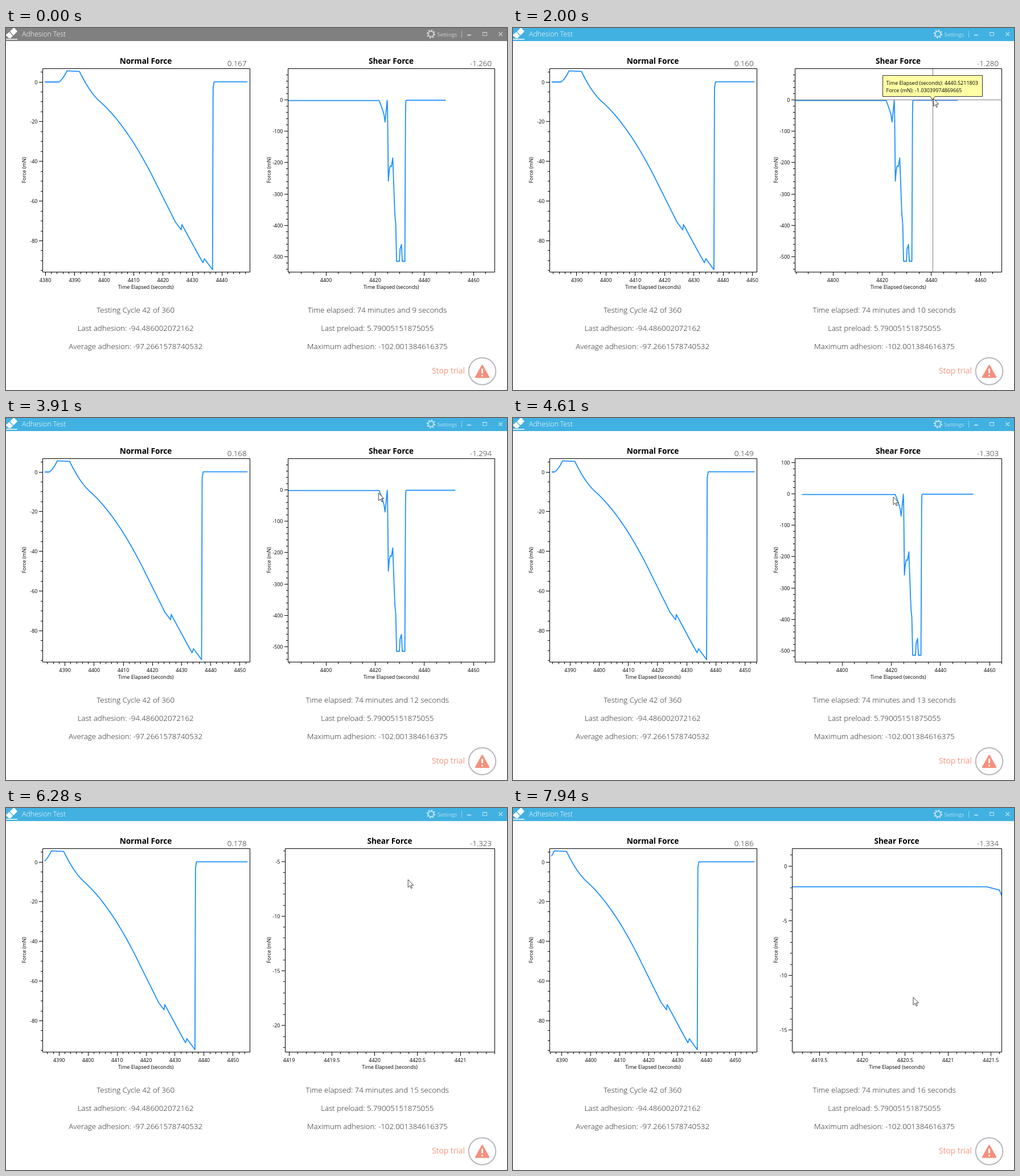
Animation, 880 px wide and 637 px high, one loop 8 s. Source, as an HTML page:

```html
<!DOCTYPE html>
<html lang="en">
<head>
<meta charset="utf-8">
<title>Adhesion Test</title>
<style>
  html, body { margin: 0; width: 100%; height: 100%; overflow: hidden; background: #fff; }
  svg { display: block; width: 100%; height: 100%; font-family: "Open Sans", "Noto Sans", sans-serif; }
  .info { font-size: 13.35px; font-weight: 300; fill: #222; }
  .mid { text-anchor: middle; }
  .end { text-anchor: end; }
  .axis { font-size: 9px; fill: #000; }
  .title { font-size: 13.6px; font-weight: 700; }
  .frame { fill: none; stroke: #000; }
  .curve { fill: none; stroke: #1e90ff; stroke-width: 1.8; stroke-linejoin: round; }
</style>
</head>
<body>
<svg viewBox="0 0 880 637">
  <defs>
    <clipPath id="clipN"><rect x="65" y="72" width="364" height="357"/></clipPath>
    <clipPath id="clipS"><rect id="clipRect" y="72" height="357"/></clipPath>
  </defs>
  <rect width="880" height="637" fill="#fff"/>

  <rect id="bar" width="880" height="23"/>
  <g fill="#fff">
    <path d="M7 6L13 0H15L20 6L13 13ZM6 7L12 14L8 18H5L0 13V12ZM0 19H20V20.5H0Z"/>
    <text x="28" y="15" font-size="12.3" font-weight="300">Adhesion Test</text>
  </g>
  <g fill="none" stroke="#fff" opacity=".62">
    <circle cx="746.5" cy="10.5" r="4.8" stroke-width="2"/>
    <circle cx="746.5" cy="10.5" r="6.7" stroke-width="2.2" stroke-dasharray="2.63"/>
    <path d="M800.5 5V17" opacity=".7"/>
    <path d="M810 12.5H817" stroke-width="2"/>
    <path d="M837.5 7.5H844.5V13.5H837.5ZM837 8H845"/>
    <path d="M865.5 7.5L872 14M872 7.5L865.5 14" stroke-width="1.4"/>
    <text x="757.5" y="14.5" font-size="9.4" fill="#fff" stroke="none">Settings</text>
  </g>

  <g id="plots"></g>

  <g class="info">
    <text id="normalNow" class="end" x="422.5" y="67.3"/>
    <text id="shearNow" class="end" x="853" y="67.3"/>
    <g class="mid">
      <text x="227.7" y="501">Testing Cycle 42 of 360</text>
      <text x="227.7" y="533">Last adhesion: -94.486002072162</text>
      <text x="227.7" y="565">Average adhesion: -97.2661578740532</text>
      <text id="elapsed" x="652.3" y="501"/>
      <text x="652.3" y="533">Last preload: 5.79005151875055</text>
      <text x="652.3" y="565">Maximum adhesion: -102.001384616375</text>
    </g>
  </g>

  <text class="end" x="806" y="608" font-size="13.8" fill="#f5977f">Stop trial</text>
  <circle cx="836.5" cy="604" r="23.8" fill="none" stroke="#b7b7bf" stroke-width="2"/>
  <path d="M836.5 594L847.8 614.5H825.2Z" fill="#f4907e" stroke="#f4907e" stroke-width="2.6" stroke-linejoin="round"/>
  <path d="M836.5 599.5V607.5M836.5 610.5V613" stroke="#fff" stroke-width="2.8"/>

  <g id="tracker">
    <path id="cross" fill="none" stroke="#808080"/>
    <g id="tip">
      <path d="M-87.5 83.5H87.5V120.5H4L0 126.5L-4 120.5H-87.5Z" fill="#ffffa5" stroke="#333"/>
      <text id="tipTime" class="axis" x="-81.5" y="100"/>
      <text id="tipForce" class="axis" x="-81.5" y="112.5"/>
    </g>
  </g>

  <g id="cursor" fill="#fff" stroke="#222" stroke-width=".85" stroke-linejoin="round">
    <path id="arrow" d="M0 0V13.6L3.2 10.7L5.4 15.6L7.3 14.7L5.2 10H9.5Z"/>
    <path id="hand" d="M0 .5Q1.3 -.5 2 1V6.5L4 6Q5 6 5.2 7L7 6.8Q8 7 8 8Q9.3 8 9.3 9.3V13L8 17.5H0L-4.5 11Q-5.3 9.5-4 9.2Q-2.8 9-1 11V1.3ZM5.2 7V9.5M8 8V10M2 6.5V9"/>
  </g>
</svg>
<script>
const $ = id => document.getElementById(id);
const LOOP = 8000, TOP = 72, BOTTOM = 429;

// Knots: seconds after base, force in mN, optional bulge of the segment leading there
const normal = { base: 4380, knots: [
  [-9, 0], [4.6, 0], [7.35, 5.6, -3], [11.6, 5.35], [19, -10.4, -6.8], [37.75, -51.4, 15.7],
  [44.3, -70.7], [46.2, -74.4], [46.45, -71.8], [52.05, -87], [53.6, -91], [54.1, -89],
  [56.85, -94.5], [57.05, -3], [57.4, .1], [99, .1]] };
const shear = { base: 4420, knots: [
  [-50, -1.9], [1.45, -1.9], [1.6, -2.2], [3.6, -48, 8], [4, -70.6], [4.9, -1.3], [5.02, -30],
  [5.34, -259], [6.15, -210, 40], [6.6, -212], [7.13, -185], [8, -367], [8.35, -394],
  [8.7, -514.5], [9.86, -514.5], [10.09, -476], [10.67, -461], [11.02, -514.5],
  [12.06, -514.5], [12.33, -46], [12.45, -4], [12.7, -1], [70, -.9]] };

// Pointer strokes: start, end, destination
const entry = { t: .45, x: 722, y: 602 };
const strokes = [
  [.45, .82, 742, 127], [1.14, 1.9, 738.4, 124], [2.35, 3.12, 727, 127], [3.4, 4.02, 652, 132],
  [4.27, 4.5, 668, 139], [6.16, 6.35, 712, 124], [6.4, 7.36, 678, 228], [7.45, 7.92, 703, 333]];

// Time, normal and shear reading
const readings = [
  [0, .167, -1.26], [2, .16, -1.28], [3.22, .164, -1.296], [4.61, .149, -1.303],
  [5.63, .176, -1.313], [7.01, .156, -1.348], [7.94, .186, -1.334]];

const mix = (a, b, p) => a + (b - a) * p;
const ramp = (t, a, b) => Math.min(1, Math.max(0, (t - a) / (b - a)));
const easeOut = p => 1 - (1 - p) ** 2;
const steps = (p, n) => Math.round(p * n) / n;

function shearView(t) {
  const wheel = 2.89 ** steps(ramp(t, 4.75, 5.6), 8) * 12.06 ** steps(ramp(t, 5.77, 6.16), 5);
  const drag1 = easeOut(ramp(t, 4.27, 4.5)), drag2 = easeOut(ramp(t, 6.4, 7.36));
  return {
    kx: 4.318 * wheel, ky: .552 * wheel, t0: 4420, right: 859,
    x0: 665 + (16 * drag1 - 16.5) * wheel - 34 * drag2,
    y0: 137.5 + (7 * drag1 - 11) * wheel + 104 * drag2
  };
}

function normalView(t) {
  const x0 = 120.7 - 4.38 * t;
  return { kx: (430.7 - 5.07 * t - x0) / 60, ky: 3.494, t0: 4390, x0, y0: 95, left: 64, right: 428 };
}

// Smallest 1-2-5 interval that is at least 45 px wide
function ticks(min, max, scale) {
  const least = 45 / scale, unit = 10 ** Math.floor(Math.log10(least));
  const m = [1, 2, 5, 10].find(n => n * unit >= least);
  const parts = m === 2 ? 4 : 5, minor = m * unit / parts, list = [];
  for (let i = Math.ceil(min / minor); i <= max / minor; i++)
    list.push({ v: +(i * minor).toFixed(6) + 0, major: i % parts === 0 });
  return list;
}

function curvePath({ base, knots }, from, to, X, Y) {
  const out = [];
  for (let i = 1; i < knots.length; i++) {
    const [s0, v0] = knots[i - 1], [s1, v1, bulge = 0] = knots[i];
    const lo = ramp(from - base, s0, s1), hi = ramp(to - base, s0, s1);
    if (lo >= hi) continue;
    const n = bulge ? 24 : 1;
    for (let j = 0; j <= n; j++) {
      const p = mix(lo, hi, j / n);
      const v = mix(v0, v1, p) + bulge * p * (1 - p);
      out.push(X(base + mix(s0, s1, p)).toFixed(2) + " " + Y(v).toFixed(2));
    }
  }
  return "M" + out.join("L");
}

function plot(name, view, data, from, to, clip, labelX) {
  const { kx, ky, t0, x0, y0, right } = view;
  const yTicks = ticks((y0 - BOTTOM) / ky, (y0 - TOP) / ky, ky);
  const wide = yTicks.some(k => k.major && String(k.v).length > 3);
  const left = view.left ??= wide ? 495 : 490;
  const X = s => x0 + (s - t0) * kx, Y = v => y0 - v * ky;
  const snap = n => Math.floor(n) + .5;
  let marks = "", labels = "";
  for (const { v, major } of yTicks) {
    marks += `M${left} ${snap(Y(v))}h${major ? -6 : -3}`;
    if (major) labels += `<text class="end" x="${left - 8.5}" y="${Y(v) + 3.5}">${v}</text>`;
  }
  for (const { v, major } of ticks(t0 + (left - x0) / kx, t0 + (right - x0) / kx, kx)) {
    marks += `M${snap(X(v))} 430v${major ? 6 : 3}`;
    if (major) labels += `<text class="mid" x="${X(v)}" y="447">${v}</text>`;
  }
  const mid = (left + right) / 2 - .5;
  return `<path class="curve" clip-path="url(#${clip})" d="${curvePath(data, from, to, X, Y)}"/>
    <path class="frame" d="M${left + .5} 71.5H${right + .5 - (right > 500)}V429.5H${left + .5}Z${marks}"/>
    <g class="axis">${labels}
      <text class="mid" x="${mid}" y="459">Time Elapsed (seconds)</text>
      <text class="mid" transform="translate(${labelX} 250) rotate(-90)">Force (mN)</text>
    </g>
    <text class="title mid" x="${mid}" y="62.5">${name}</text>`;
}

function showReadings(t) {
  const i = readings.findLastIndex(r => t >= r[0]);
  const a = readings[i], b = readings[i + 1] ?? a;
  const n = Math.floor((t - a[0]) / .1);
  const p = b === a ? 0 : n * .1 / (b[0] - a[0]);
  const noise = Math.sin(n * 12.9) * .012;
  $("normalNow").textContent = (mix(a[1], b[1], p) + noise).toFixed(3);
  $("shearNow").textContent = (mix(a[2], b[2], p) + noise / 2).toFixed(3);
}

function showPointer(t, view) {
  let { x, y } = entry;
  for (const [a, b, toX, toY] of strokes) {
    const p = easeOut(ramp(t, a, b));
    x = mix(x, toX, p);
    y = mix(y, toY, p);
  }
  const drag = (t >= 4.27 && t < 4.5) || (t >= 6.4 && t < 7.4);
  $("cursor").style.display = t < entry.t ? "none" : "";
  $("cursor").setAttribute("transform", `translate(${x} ${y})`);
  $("arrow").style.display = drag ? "none" : "";
  $("hand").style.display = drag ? "" : "none";

  const on = t >= 1.14 && t < 3.4;
  $("tracker").style.display = on ? "" : "none";
  if (on) showTracker(x - 1.3, view);
}

// Snaps to the nearest sample, eight per second
function showTracker(x, view) {
  const first = 4437.8961803, step = .125;
  const k = Math.round((view.t0 + (x - view.x0) / view.kx - first) / step);
  const time = first + k * step, force = -.901440717584918 - k * .00614090624341581;
  const px = Math.round(view.x0 + (time - view.t0) * view.kx);
  $("cross").setAttribute("d", `M${px + .5} 72V429M495 126.5H859`);
  $("tip").setAttribute("transform", `translate(${px} 0)`);
  $("tipTime").textContent = "Time Elapsed (seconds): " + time.toFixed(7);
  $("tipForce").textContent = "Force (mN): " + force.toPrecision(15);
}

function draw(t) {
  const from = 4379.8 + .83 * t, to = 4448.7 + t, view = shearView(t);
  $("bar").setAttribute("fill", t < 1.14 ? "#808080" : "#41b1e1");
  $("plots").innerHTML =
    plot("Normal Force", normalView(t), normal, from, to, "clipN", 34.5) +
    plot("Shear Force", view, shear, from, to, "clipS", 464.5);
  $("clipRect").setAttribute("x", view.left);
  $("clipRect").setAttribute("width", 859 - view.left);
  const secs = Math.floor(9 + (t + .02) / 1.02);
  $("elapsed").textContent = `Time elapsed: 74 minutes and ${secs} seconds`;
  showReadings(t);
  showPointer(t, view);
}

const start = performance.now();
function loop() {
  draw((performance.now() - start) % LOOP / 1000);
  requestAnimationFrame(loop);
}
loop();
</script>
</body>
</html>
```
